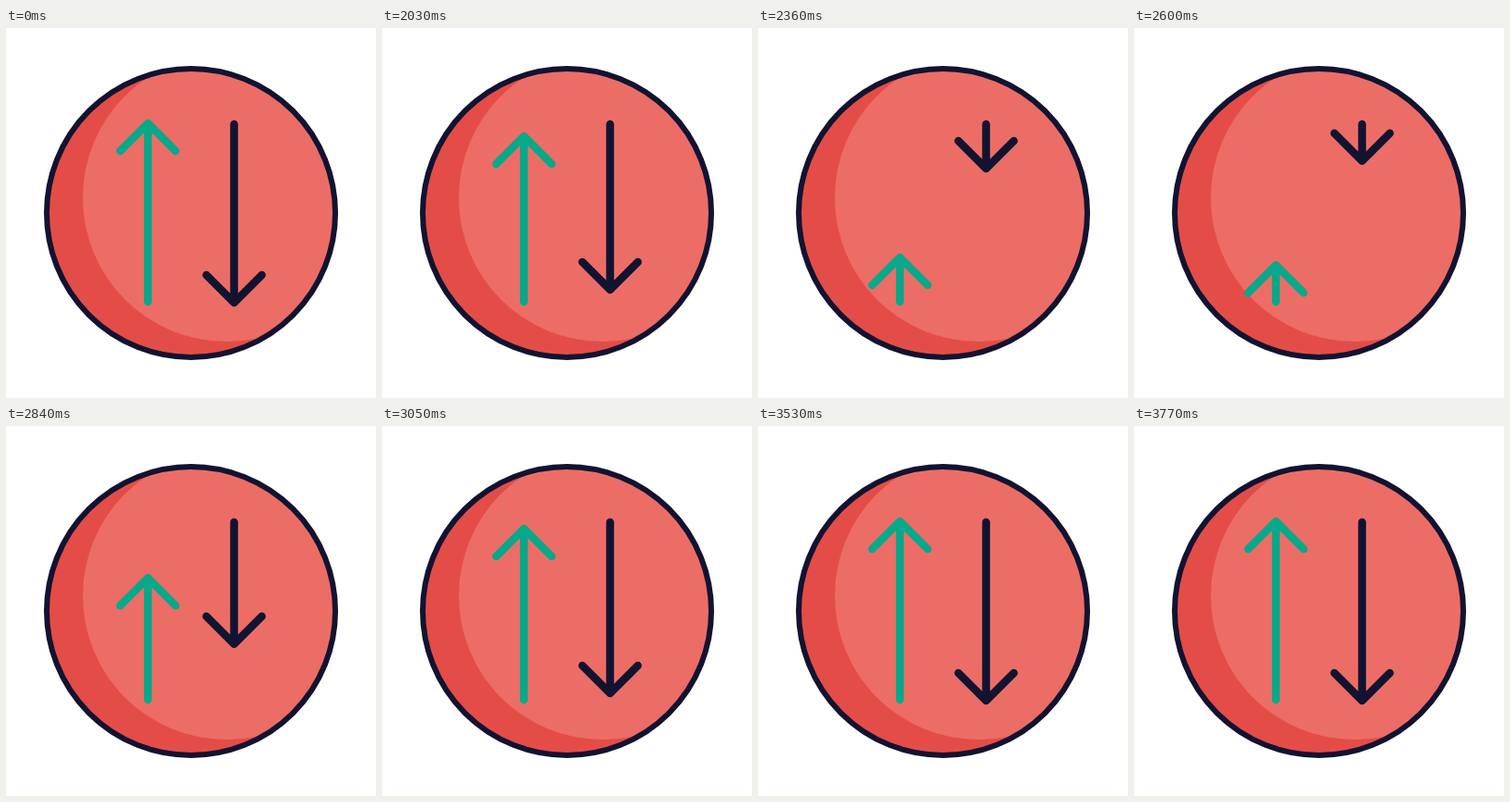
An HTML page for the animation above (3830 ms loop, 400x400 px).

```html
<!DOCTYPE html>
<html lang="en">
<head>
<meta charset="utf-8">
<title>Up and down arrows</title>
<style>
  html, body { margin: 0; width: 100%; height: 100%; overflow: hidden; background: #fff; }
  svg { display: block; width: 100vw; height: 100vh; }
  .arrow { fill: none; stroke-width: 8.5; stroke-linecap: round; stroke-linejoin: round; }
</style>
</head>
<body>
<svg viewBox="0 0 400 400">
  <clipPath id="disc"><circle cx="200" cy="200" r="156"/></clipPath>
  <circle cx="200" cy="200" r="156" fill="#e44d47"/>
  <circle cx="238.5" cy="183.5" r="155.5" fill="#ec6d66" clip-path="url(#disc)"/>
  <circle cx="200" cy="200" r="156" fill="none" stroke="#121331" stroke-width="6"/>
  <path class="arrow" stroke="#08a88a"/>
  <path class="arrow" stroke="#121331" transform="rotate(180 200 200)"/>
</svg>
<script>
  const LOOP = 3830, HOLD = 2000, STEP = 30;
  const TRAVEL = 162, TURN = 16.5, END = 40;
  const arrows = document.querySelectorAll('.arrow');

  // Cubic Bezier easing, solved by bisection
  function bezier(x1, y1, x2, y2) {
    const at = (a, b, s) => 3 * a * s * (1 - s) ** 2 + 3 * b * s * s * (1 - s) + s ** 3;
    return p => {
      let lo = 0, hi = 1;
      for (let i = 0; i < 24; i++) {
        const mid = (lo + hi) / 2;
        if (at(x1, x2, mid) < p) lo = mid; else hi = mid;
      }
      return at(y1, y2, lo);
    };
  }
  const shrink = bezier(1 / 3, 0.477, 2 / 3, 1);
  const grow = bezier(0.4, 0, 0.4, 1);

  // How far the head has moved towards the tail
  function offset(step) {
    if (step <= 0 || step >= END) return 0;
    if (step < TURN) return TRAVEL * shrink(step / TURN);
    return TRAVEL * (1 - grow((step - TURN) / (END - TURN)));
  }

  function draw(now) {
    const step = Math.floor((now % LOOP - HOLD) / STEP);
    const tip = 103 + offset(step);
    const d = `M153.4 296V${tip}M123.4 ${tip + 30}L153.4 ${tip}L183.4 ${tip + 30}`;
    arrows.forEach(a => a.setAttribute('d', d));
  }

  const start = performance.now();
  function tick() {
    draw(performance.now() - start);
    requestAnimationFrame(tick);
  }
  tick();
</script>
</body>
</html>
```
